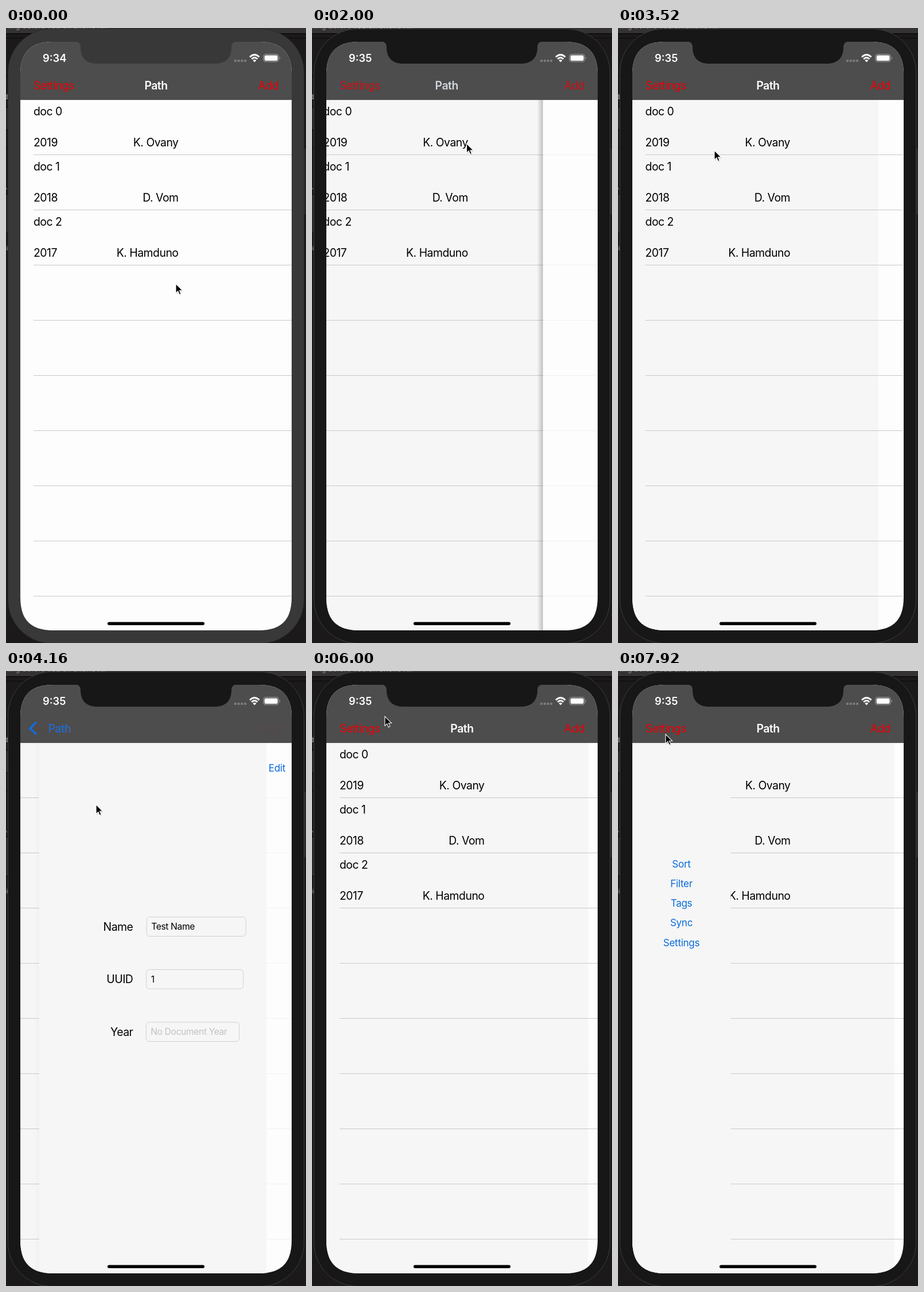
Animation of 523x1070 px, one loop 8000 ms. Source, as an HTML page:

```html
<!DOCTYPE html>
<html lang="en">
<head>
<meta charset="utf-8">
<title>Document list</title>
<style>
html, body { margin: 0; width: 100%; height: 100%; overflow: hidden; background: #1b191a; }
svg { display: block; width: 523px; height: 1070px; font-family: Inter, Roboto, sans-serif; }
.body { font-size: 19.4px; letter-spacing: -.5px; }
.button { font-size: 17.1px; letter-spacing: -.3px; fill: #0a6cdc; }
.field { font-size: 15.7px; letter-spacing: -.4px; }
.bold { font-weight: 600; fill: #fff; }
.red { fill: #ea0006; }
.end { text-anchor: end; }
.mid { text-anchor: middle; }
</style>
</head>
<body>
<svg viewBox="0 0 523 1070">
  <defs>
    <clipPath id="screen"><path d="M25 80Q25 24 81 24H442Q498 24 498 80V990C498 1030 480 1048 440 1048H83C43 1048 25 1030 25 990Z"/></clipPath>
    <clipPath id="listClip"><rect id="listBox" x="25" y="125" width="473" height="923"/></clipPath>
    <clipPath id="detailClip"><rect id="detailBox" x="25" y="125" width="473" height="923"/></clipPath>
    <linearGradient id="shade"><stop offset="0" stop-opacity="0"/><stop offset="1" stop-opacity=".22"/></linearGradient>
  </defs>

  <g id="desktop">
    <rect width="523" height="1070" fill="#1b191a"/>
    <rect width="523" height="9" fill="#353233"/>
    <rect y="9" width="523" height="1.5" fill="#0c0b0b"/>
    <rect y="17" width="523" height="1" fill="#0c0b0b"/>
    <text x="-2" y="1" font-size="13" fill="#858384">ning before you on phone XII</text>
    <path d="M0 83H5M0 138H5M0 177H5M0 210H5M0 289H5M0 357H5" stroke="#060606"/>
    <path d="M0 139H4V176H0ZM0 290H4V356H0Z" fill="#2a2829"/>
    <g fill="#aaa" font-size="12"><text x="-4" y="124">d</text><text x="-2" y="284" font-size="9">^</text><text x="-5" y="387" font-size="10">ei</text></g>
    <path d="M520 210H523V324H520Z" fill="#2b2a2b"/>
  </g>
  <rect id="bezel" x="3.5" y="1.5" width="516" height="1069" rx="76" stroke-width="1"/>

  <g clip-path="url(#screen)">
    <rect x="25" y="24" width="473" height="1024" fill="#fdfdfd"/>
    <rect id="dim" x="25" y="125" height="923" fill="#f6f6f6"/>
    <g id="residue" stroke="#f1f1f1"></g>
    <g clip-path="url(#listClip)"><g id="list" class="body"></g></g>
    <rect id="shadow" y="125" width="10" height="923" fill="url(#shade)"/>
    <g clip-path="url(#detailClip)"><g id="detail"></g></g>
    <g id="sidebar" class="button mid"><rect x="25" y="125" width="171.5" height="923" fill="#f6f6f6"/></g>

    <rect x="25" y="24" width="473" height="101" fill="#4d4d4d"/>
    <rect x="25" y="124.6" width="473" height=".8" opacity=".3"/>
    <g class="body">
      <g id="rootItems" class="red">
        <text id="settings" x="48" y="106.5">Settings</text>
        <text class="end" x="475" y="106.5">Add</text>
      </g>
      <text id="title" class="bold mid" x="261.5" y="106.5">Path</text>
      <g id="back" fill="#0a70ee">
        <path d="M53 89L42 99.7L53 110.5" fill="none" stroke="#0a70ee" stroke-width="3.4"/>
        <text id="backLabel" x="58.5" y="106.5">Path</text>
      </g>
    </g>

    <text id="clock" class="bold" x="64" y="59" font-size="18.3"></text>
    <g fill="#7b7b7b"><rect x="398" y="55" width="4" height="4" rx="1"/><rect x="403.7" y="55" width="4" height="4" rx="1"/><rect x="409.4" y="55" width="4" height="4" rx="1"/><rect x="415" y="55" width="4" height="4" rx="1"/></g>
    <g fill="none" stroke="#fff" stroke-width="2.7">
      <path d="M425 50.5Q433.3 42.5 441.6 50.5M428.2 54Q433.3 49 438.4 54"/>
    </g>
    <path d="M430.3 56.2Q433.3 53.6 436.3 56.2L433.3 59.4Z" fill="#fff"/>
    <rect x="448.8" y="45.7" width="26.5" height="13" rx="3.6" fill="none" stroke="#a5a5a5"/>
    <rect x="450.6" y="47.5" width="23" height="9.4" rx="2.2" fill="#fff"/>
    <path d="M477 50Q479 52.2 477 54.5Z" fill="#a5a5a5"/>
    <rect x="177" y="1033.5" width="169" height="5.5" rx="2.7"/>
  </g>
  <path id="notch" d="M121 23.5Q130 24 130 33C130 52 140 62 159 62H364C383 62 393 52 393 33Q393 24 402 23.5Z"/>

  <g id="cursor">
    <path d="M1 2V18L5 15L7 20L10 19L8 14L13 13Z" opacity=".16"/>
    <path d="M0 0V16.3L3.8 12.8L6.3 18.7L9 17.5L6.5 11.7H11.6Z" stroke="#fff" stroke-width="1.1"/>
  </g>
</svg>
<script>
const LOOP = 8000, STEP = 80, LEFT = 25, WIDTH = 473;
const $ = id => document.getElementById(id);
const set = (id, attrs) => { for (const k in attrs) $(id).setAttribute(k, attrs[k]); };
const clamp = v => Math.min(1, Math.max(0, v));
const text = (x, y, label, cls = '') => `<text x="${x}" y="${y}" class="${cls}">${label}</text>`;

// Static content
const people = ['K. Ovany', 'D. Vom', 'K. Hamduno'];
const lineYs = Array.from({ length: 9 }, (_, i) => 220.5 + 96 * i);
const lines = x => lineYs.map(y => `<path d="M${x} ${y}H498"/>`).join('');
$('residue').innerHTML = lines(LEFT);
$('list').innerHTML = `<g stroke="#c9c9c9">${lines(48)}</g>` + people.map((name, i) => {
  const y = 152 + 96 * i;
  return text(48, y, 'doc ' + i) + text(48, y + 54, 2019 - i) + text(300.5, y + 54, name, 'end');
}).join('');

const fields = [
  ['Name', 'Test Name', 212.5, 173],
  ['UUID', '0', 212, 169],
  ['Year', 'No Document Year', 211.5, 162.5]
];
$('detail').innerHTML = text(425, 174.5, 'Edit', 'button') + fields.map(([label, value, x, w], i) => {
  const y = 428 + 91.5 * i;
  return text(188.7, y + 23.7, label, 'body end') +
    `<rect x="${x}" y="${y}" width="${w}" height="33.5" rx="5.5" fill="none" stroke="#d0d0d0"/>` +
    `<g id="value${i}" fill="${i == 2 ? '#c2c2c4' : '#000'}">${text(x + 8, y + 22, value, 'field')}</g>`;
}).join('');
$('sidebar').innerHTML += ['Sort', 'Filter', 'Tags', 'Sync', 'Settings']
  .map((label, i) => text(110.5, 341.5 + 34.3 * i, label)).join('');

// Pointer stops: time, x, y
const stops = [
  [0, 296, 445], [240, 243, 568], [400, 243, 568], [1280, 292, 256], [1440, 269.5, 201],
  [2000, 269.5, 201], [2480, 181, 377], [2800, 107, 130], [3040, 99, 109], [3200, 99, 109],
  [3520, 168, 213], [3680, 185, 258], [4000, 185, 258], [4800, 45, 130], [5040, 29.5, 95],
  [5120, 29.5, 95], [5280, 66, 94], [5440, 66, 94], [6000, 127, 79], [6240, 140, 170],
  [6480, 130, 372], [6880, 52, 90], [7120, 84.5, 101], [7200, 83, 110], [LOOP, 83, 110]
];
function pointer(t) {
  const i = stops.findIndex(s => s[0] > t);
  const [t0, x0, y0] = stops[i - 1], [t1, x1, y1] = stops[i];
  const u = (t - t0) / (t1 - t0);
  return [x0 + (x1 - x0) * u, y0 + (y1 - y0) * u];
}

// Critically damped spring, 0 to 1
function spring(t, start) {
  const x = Math.max(0, t - start) * .022;
  return 1 - (1 + x) * Math.exp(-x);
}

function pushed(t) {
  if (t < 3200) return spring(t, 1962.3);
  if (t < 4000) return 1 - spring(t, 3162.3);
  if (t < 5440) return spring(t, 3962.3);
  return 1 - spring(t, 5446);
}

function draw(t) {
  const p = pushed(t), edge = LEFT + WIDTH * (1 - p), moving = p > .004 && p < .996;
  const active = t >= 480;
  set('bezel', { fill: active ? '#171717' : '#383838', stroke: active ? '#3d3d3d' : '#2a2a2a' });
  set('notch', { fill: active ? '#171717' : '#383838' });
  $('clock').textContent = t < 800 ? '9:34' : '9:35';

  const dimEnd = t < 2000 ? LEFT : t < 3360 ? 402.6 : t < 5680 ? 454 : 481.5;
  set('dim', { width: dimEnd - LEFT });
  set('residue', { opacity: p > .004 ? 1 : 0, transform: `translate(${dimEnd - LEFT})` });

  set('listBox', { width: edge - LEFT });
  set('list', { transform: `translate(${-.3 * WIDTH * p})` });
  set('detailBox', { x: edge, width: 498 - edge });
  set('detail', { transform: `translate(${edge - LEFT})` });
  set('shadow', { x: edge - 10, opacity: moving ? clamp((1 - p) * 1.25) : 0 });
  $('value1').firstChild.textContent = t < 4000 ? 0 : 1;

  // The title travels to the place of the back label
  const travel = 183 * p ** 1.2;
  set('rootItems', { opacity: clamp(1 - p) });
  set('title', { opacity: clamp(1 - p * .9 - p * p * .1), transform: `translate(${-travel})` });
  set('back', { opacity: clamp((p - .12) / .88) });
  set('backLabel', { x: 58.5 + 183 - travel });
  set('settings', { opacity: t >= 7440 && t < 7600 ? .4 : 1 });

  const u = clamp((t - 7440) / 400);
  set('sidebar', { opacity: u * u * (3 - 2 * u) });
  set('cursor', { transform: `translate(${pointer(t)})` });
}

const began = performance.now();
function frame() {
  const t = (performance.now() - began) % LOOP;
  draw(Math.floor(t / STEP) * STEP);
  requestAnimationFrame(frame);
}
frame();
</script>
</body>
</html>
```
